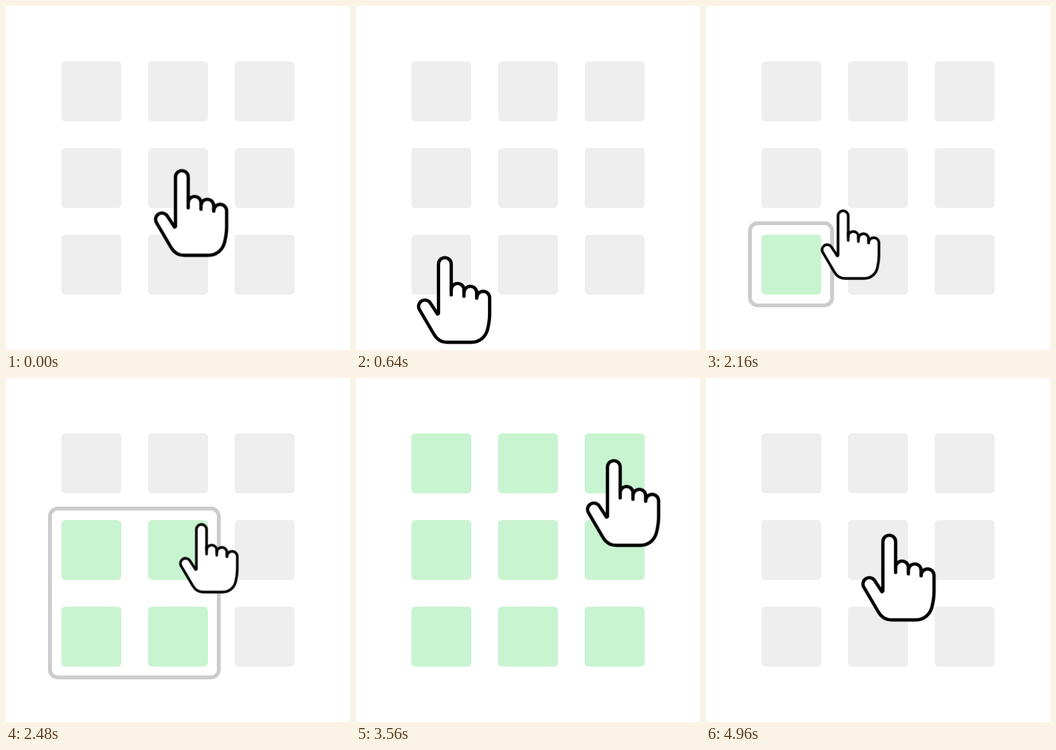
These frames come from a looping animation (540 px wide and 540 px high, 5 s). An HTML page:

```html
<!DOCTYPE html>
<html lang="en">
<head>
<meta charset="utf-8">
<title>Drag to select</title>
<style>
  :root { --idle: #eee; --picked: #c8f4d0; }

  html, body { margin: 0; width: 100%; height: 100%; overflow: hidden; background: #fff; }

  .stage { position: relative; width: 540px; height: 540px; overflow: hidden; }

  .tiles {
    position: absolute; left: 86.6px; top: 86.6px;
    display: grid; gap: 41.2px;
    grid-template: repeat(3, 94.8px) / repeat(3, 94.8px);
  }
  .tiles i {
    border-radius: 6px; background: var(--idle);
    animation: pick-third 5s linear infinite;
  }
  .tiles .second { animation-name: pick-second; }
  .tiles .first { animation-name: pick-first; }

  @keyframes pick-first {
    0%, 24.6% { background: var(--idle); }
    24.7%, 88% { background: var(--picked); }
    96%, 100% { background: var(--idle); }
  }
  @keyframes pick-second {
    0%, 43.6% { background: var(--idle); }
    43.7%, 88% { background: var(--picked); }
    96%, 100% { background: var(--idle); }
  }
  @keyframes pick-third {
    0%, 54% { background: var(--idle); }
    54.1%, 88% { background: var(--picked); }
    96%, 100% { background: var(--idle); }
  }

  /* The selection frame snaps outward from its lower left corner */
  .frame {
    position: absolute; left: 65.5px; bottom: 67.5px;
    box-sizing: border-box; border: 6px solid #ccc; border-radius: 15px;
    animation: select 5s step-end infinite;
  }
  @keyframes select {
    0% { opacity: 0; width: 135px; height: 135px; }
    24.7% { opacity: 1; width: 135px; height: 135px; }
    43.7% { opacity: 1; width: 271px; height: 271px; }
    54.1% { opacity: 1; width: 407px; height: 407px; }
    70.3%, 100% { opacity: 0; width: 407px; height: 407px; }
  }

  svg { position: absolute; inset: 0; }

  /* The hand's cycle begins 440 ms before the loop point */
  .travel { animation: travel 5s linear -440ms infinite; }
  .press { transform-origin: 277.8px 267.2px; animation: press 5s linear -440ms infinite; }

  @keyframes travel {
    0% {
      transform: translate(128.2px, -128.2px);
      animation-timing-function: cubic-bezier(.167, .167, .667, 1);
    }
    24% { transform: translate(-142.8px, 142.8px); }
    46.4% {
      transform: translate(-142.8px, 142.8px);
      animation-timing-function: cubic-bezier(.167, .167, .667, 1);
    }
    70.4%, 100% { transform: translate(128.2px, -128.2px); }
  }
  @keyframes press {
    0%, 32% { transform: scale(1); }
    33.6%, 78.4% { transform: scale(.8); }
    80%, 100% { transform: scale(1); }
  }
</style>
</head>
<body>
<div class="stage">
  <div class="tiles">
    <i></i><i></i><i></i>
    <i class="second"></i><i class="second"></i><i></i>
    <i class="first"></i><i class="second"></i><i></i>
  </div>
  <div class="frame"></div>
  <svg width="540" height="540" viewBox="0 0 540 540">
    <g class="travel">
      <g class="press" fill="#fff" stroke="#000" stroke-width="5.2" stroke-linecap="round" stroke-linejoin="round">
        <path d="M286.5 308.5V268a10 10 0 0 0-20 0V345.5L265 346.5L253.3 328.6
          A10 10 0 0 0 236.3 339L259.5 378.5C264 386 271 390.8 280 390.8H318
          C331 390.8 341 382 343.7 370C345.6 362 346.8 355 346.8 346V321
          a10.1 10.1 0 0 0-20.3 0V313a10 10 0 0 0-20 0V308.5a10 10 0 0 0-20 0Z"/>
        <path fill="none" d="M286.5 300V316.3M306.5 308.5V318.5M326.5 313V321.5"/>
      </g>
    </g>
  </svg>
</div>
</body>
</html>
```
